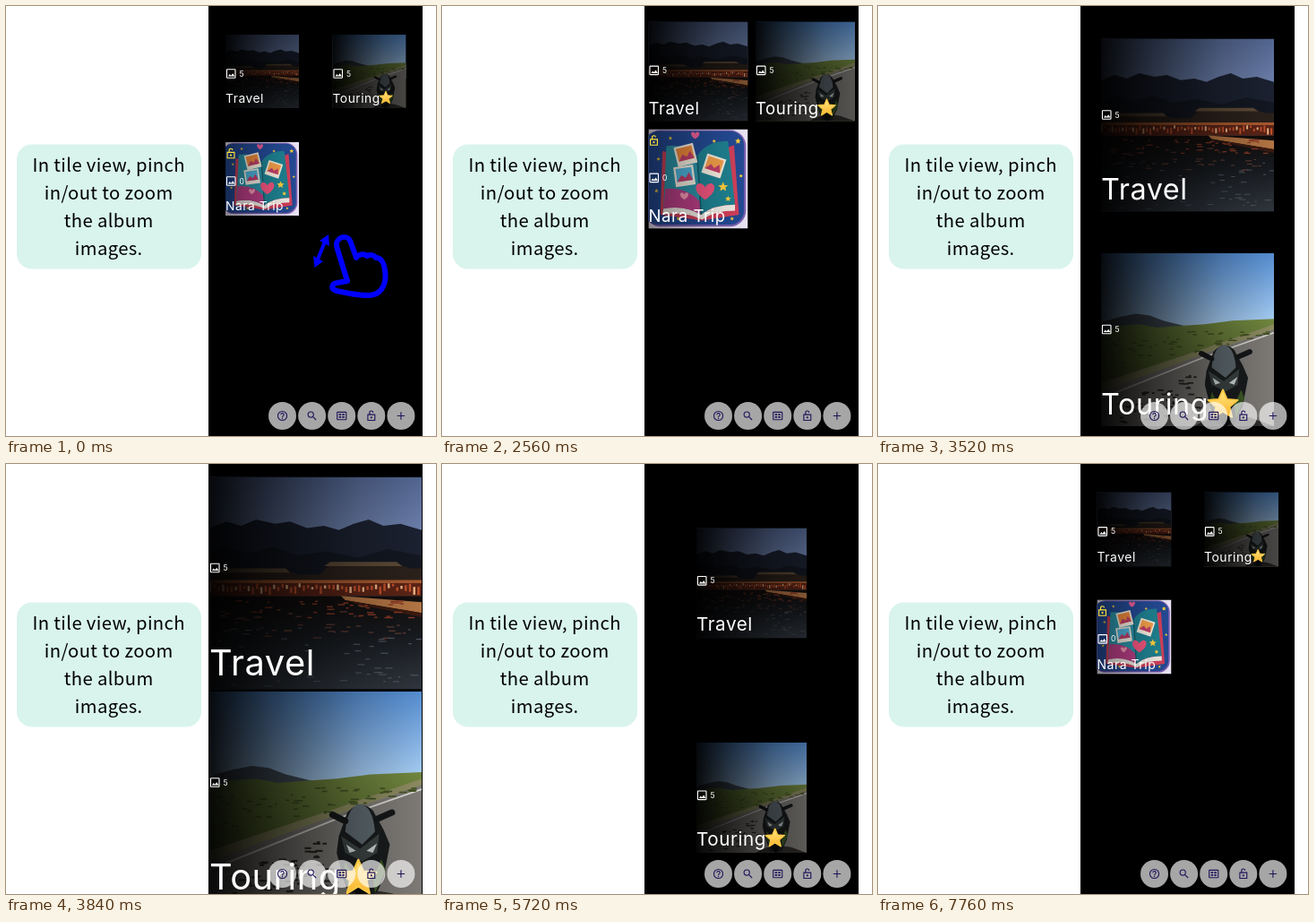
These frames come from a looping animation (480 px wide and 480 px high, 8.24 s). An HTML page:

```html
<!DOCTYPE html>
<html lang="en">
<head>
<meta charset="utf-8">
<title>Tile view zoom</title>
<style>
html, body { margin: 0; width: 100%; height: 100%; overflow: hidden; background: #fff; }
svg { display: block; width: 100vw; height: 100vh; }
.note { font: 20.3px "Noto Sans CJK JP", "Noto Sans CJK", "Noto Sans", sans-serif; letter-spacing: .35px; text-anchor: middle; }
.name { font-family: Inter, Roboto, sans-serif; letter-spacing: .55px; fill: #fff; }
.count { font: 8.5px Inter, Roboto, sans-serif; fill: #fff; }
.line { fill: none; stroke: currentColor; stroke-width: 2; }
.dot { fill: currentColor; }
</style>
</head>
<body>
<svg id="stage" viewBox="0 0 480 480">
  <defs>
    <clipPath id="screen"><rect x="226" width="239" height="480"/></clipPath>
    <clipPath id="square"><rect width="100" height="100"/></clipPath>
    <linearGradient id="shade">
      <stop stop-opacity=".93"/>
      <stop offset=".3" stop-opacity=".6"/>
      <stop offset=".7" stop-opacity=".2"/>
      <stop offset="1" stop-opacity="0"/>
    </linearGradient>
    <linearGradient id="dusk" x2="0" y2="1">
      <stop stop-color="#52658f"/><stop offset=".5" stop-color="#7083ae"/>
    </linearGradient>
    <linearGradient id="water" x2="0" y2="1">
      <stop stop-color="#120d0c"/><stop offset=".4" stop-color="#16191d"/><stop offset="1" stop-color="#30363e"/>
    </linearGradient>
    <linearGradient id="day" x2="0" y2="1">
      <stop stop-color="#548cd0"/><stop offset=".7" stop-color="#abd0f4"/>
    </linearGradient>
    <linearGradient id="grass" x2="0" y2="1">
      <stop stop-color="#71873f"/><stop offset=".6" stop-color="#4f6029"/>
    </linearGradient>
    <linearGradient id="gold" x2="0" y2="1">
      <stop stop-color="#ffe680"/><stop offset="1" stop-color="#fbb52c"/>
    </linearGradient>

    <path id="star" d="M0-1 .28-.36 1-.3 .45 .16 .62 .85 0 .48-.62 .85-.45 .16-1-.3-.28-.36Z"/>
    <path id="heart" d="M0 1C-1.6 0-1-1 -.5-.8Q-.1-.7 0-.35Q.1-.7 .5-.8C1-1 1.6 0 0 1Z"/>

    <g id="image">
      <rect class="line" x="3.5" y="3.5" width="17" height="17" rx="1"/>
      <path class="dot" d="M6 17.5l3.5-4.5 2.5 3 3.5-4.5 4 6z"/>
    </g>
    <g id="lock">
      <path class="line" d="M5 9.5H19V21H5ZM8.5 9.5V6a3.5 3.5 0 0 1 7-.5"/>
      <circle class="dot" cx="12" cy="15.2" r="2"/>
    </g>
    <g id="help">
      <circle class="line" cx="12" cy="12" r="9"/>
      <path class="line" d="M9 9.8a3 3 0 1 1 4.6 2.4Q12 13.3 12 15"/>
      <circle class="dot" cx="12" cy="17.3" r="1.2"/>
    </g>
    <g id="search">
      <circle class="line" cx="9.5" cy="9.5" r="5.5"/>
      <path class="line" d="M14 14l6 6"/>
    </g>
    <g id="grid">
      <rect class="line" x="3" y="4.5" width="18" height="15" rx="1"/>
      <path class="dot" d="M6.5 8H11V11H6.5ZM13 8H17.5V11H13ZM6.5 13H11V16H6.5ZM13 13H17.5V16H13Z"/>
    </g>
    <path id="plus" class="line" d="M12 4.5v15M4.5 12h15"/>

    <g id="lake" clip-path="url(#square)">
      <rect width="100" height="60" fill="url(#dusk)"/>
      <path d="M0 24L8 21 15 23 22 20 31 22 38 21 46 24 54 23 61 25 68 22 75 20 82 23 90 22 100 25V55H0Z" fill="#1b2130"/>
      <path d="M0 36L9 33 18 36 30 33 42 37 55 35 70 38 84 34 100 37V56H0Z" fill="#131721"/>
      <rect y="56" width="100" height="44" fill="url(#water)"/>
      <path d="M0 47L6 44H36L42 46H52L57 41H88L95 43H100V50H0Z" fill="#2b211b"/>
      <path d="M57 40H88L91 42H54ZM6 43H36L38 45H3Z" fill="#5c4a36"/>
      <rect y="49" width="100" height="7" fill="#5c2416"/>
      <path d="M0 48.500H100V50H0Z" fill="#a9592f"/>
      <path d="M62 56L100 59V64L64 58Z" fill="#b27443"/>
      <path d="M64 58L100 64V66L70 60Z" fill="#3a1a10"/>
      <g id="lamps"></g>
      <g id="glints"></g>
    </g>

    <g id="road" clip-path="url(#square)">
      <rect width="100" height="60" fill="url(#day)"/>
      <path d="M0 40L10 37 20 35 28 36 36 39 48 42 56 46H0Z" fill="#4a5663"/>
      <path d="M0 45L10 42 22 41 32 43 46 42 60 41 76 39 100 38V100H0Z" fill="url(#grass)"/>
      <path d="M100 44L60 57 0 78V100H100Z" fill="#7d7a76"/>
      <path d="M0 75L60 55 100 41V44L60 58 0 80Z" fill="#8b8a60"/>
      <path d="M0 84L60 60 100 46" fill="none" stroke="#dcdad5" stroke-width=".8"/>
      <g id="pebbles"></g>
      <path d="M54 100Q68 91 86 95L100 100Z" fill="#2f2d2b"/>
      <path d="M61 68L65 57Q71 50 77 56L82 65 85 72 82 88 77 99H67L63 88 60 76Z" fill="#191c1d"/>
      <path d="M64 66Q65 54 71 53Q77 54 78 66L72 72Z" fill="#5c676d"/>
      <path d="M62 68L71 74 80 67 79 76 72 80 64 76Z" fill="#3a4242"/>
      <path d="M64.500 72L69 75 66 76ZM79 71.500L74 75 77 76Z" fill="#cfd6d6"/>
      <path d="M64 80L68 88 67 95 63 86ZM81 79L77 88 78 95 83 84Z" fill="#3c5a25"/>
      <path d="M58 58L64 61M79 60L86 57" stroke="#151718" stroke-width="3" stroke-linecap="round"/>
      <ellipse cx="72" cy="92" rx="3.6" ry="8" fill="#0b0c0c"/>
    </g>

    <g id="book" clip-path="url(#square)">
      <rect width="100" height="100" fill="#e9e3f4"/>
      <rect x="-4" y="1" width="102" height="97" rx="16" fill="#7b5fb0"/>
      <rect x="-4" y="2" width="100" height="94" rx="14" fill="#244a94"/>
      <path d="M14 22L50 30 86 16 91 86 54 92 12 86Z" fill="#d2405a"/>
      <path d="M18 17Q38 14 49 27L53 86Q36 76 15 80Z" fill="#2c93a8"/>
      <path d="M49 27Q58 12 80 12L87 76Q66 76 53 86Z" fill="#1f8292"/>
      <path d="M15 80Q36 76 53 86 66 76 87 76V82Q66 82 54 91 36 82 14 86Z" fill="#f2ede6"/>
      <path d="M17 60Q38 58 52 73L53 86Q36 76 15 80Z" fill="#b93f86"/>
      <path d="M49 27L53 86" stroke="#145b6c" stroke-width="1.5"/>
      <g id="snaps"></g>
      <use href="#heart" transform="translate(57 62) scale(9)" fill="#f2557f"/>
      <use href="#heart" transform="translate(47 6) scale(4)" fill="#f0609a"/>
      <use href="#heart" transform="translate(36 67) scale(4)" fill="#f59ab5"/>
      <g id="sparks" fill="#ffd13d"></g>
    </g>
  </defs>

  <rect width="480" height="480" fill="#fff"/>
  <rect x="12" y="154.5" width="206" height="139" rx="17" fill="#d9f4ed"/>
  <g class="note">
    <text x="114.7" y="185.2">In tile view, pinch</text>
    <text x="114.7" y="216">in/out to zoom</text>
    <text x="114.7" y="246.700">the album</text>
    <text x="114.7" y="277.500">images.</text>
  </g>

  <g clip-path="url(#screen)">
    <rect x="226" width="239" height="480"/>
    <g id="tiles"></g>
    <g id="hand" fill="none" stroke="#00f" stroke-width="6" stroke-linejoin="round">
      <path d="M381 307L369.500 270C366 259 380 253 384.500 263L391 281C394 277 399 276 403 279C407 277 411 278 413 281C420 281 423 290 423.500 300C424 313 417 323 405 323C396 323 390 322 384 321L369 318C362 316 363 310 370 309Z"/>
      <path d="M356.500 262L347.500 284" stroke-width="4"/>
      <path d="M360 255L350 262 361 268ZM344.500 292L343 279 354 285Z" fill="#00f" stroke="none"/>
    </g>
    <g id="bar" color="#20155a"></g>
  </g>
</svg>
<script>
const LOOP = 8240, FRAME = 40;
const $ = id => document.getElementById(id);

function add(parent, tag, attrs, text) {
  const el = document.createElementNS("http://www.w3.org/2000/svg", tag);
  set(el, attrs);
  if (text) el.textContent = text;
  return parent.appendChild(el);
}
function set(el, attrs) {
  for (const k in attrs) el.setAttribute(k, attrs[k]);
}

let seed = 7;
const rand = (a, b) => {
  seed = seed * 16807 % 2147483647;
  return a + (b - a) * seed / 2147483647;
};

function specks(id, n, color, height, place) {
  for (let i = 0; i < n; i++) {
    const [x, y] = place();
    add($(id), "rect", { x, y, width: rand(1, 4), height, fill: color });
  }
}

function paintPhotos() {
  for (let x = 0; x < 100; x += 2) {
    add($("lamps"), "rect", { x, y: rand(50, 52), width: 1, height: rand(1, 4), fill: x % 3 ? "#c4522c" : "#f2b98a" });
  }
  specks("glints", 45, "#8a3a26", .6, () => [rand(5, 95), rand(58, 66)]);
  specks("glints", 35, "#593831", .6, () => [rand(5, 95), rand(63, 76)]);
  specks("glints", 50, "#4c5560", .5, () => [rand(0, 98), rand(70, 100)]);
  specks("pebbles", 60, "#282623", .9, () => {
    const x = rand(8, 62);
    return [x, 88 - x * .35 + rand(0, 22)];
  });
  specks("pebbles", 60, "#435222", .7, () => {
    const x = rand(0, 98);
    return [x, 45 + rand(0, 28) * (1 - x / 100)];
  });
  for (const [x, y, turn, sky] of [[37, 25, -14, "#f08a3c"], [66, 36, 18, "#f5a04a"], [36, 46, -8, "#4fb4dc"]]) {
    const g = add($("snaps"), "g", { transform: `translate(${x} ${y}) rotate(${turn})` });
    add(g, "rect", { x: -10, y: -9, width: 20, height: 20, fill: "#f8efe2" });
    add(g, "rect", { x: -8, y: -7, width: 16, height: 13, fill: sky });
    add(g, "path", { d: "M-8 6L-3 0 1 3 5-2 8 6Z", fill: "#c33f6c" });
  }
  for (const [x, y, r] of [[75, 58, 5], [90, 12, 3], [10, 30, 2], [66, 12, 2], [22, 9, 2], [93, 47, 2], [80, 70, 3], [8, 62, 2], [30, 90, 2], [84, 90, 2]]) {
    add($("sparks"), "use", { href: "#star", transform: `translate(${x} ${y}) scale(${r})` });
  }
}

function makeTile([name, photo, count, locked, starred]) {
  const g = add($("tiles"), "g", {});
  const icon = id => add(g, "use", { href: id });
  const tile = {
    g, photo: icon("#" + photo),
    shade: add(g, "rect", { fill: "url(#shade)", opacity: locked ? .45 : 1 }),
    dim: locked ? null : add(g, "rect", {}),
    image: icon("#image"),
    count: add(g, "text", { class: "count", x: 15.5 }, count),
    name: add(g, "text", { class: "name" }, name)
  };
  set(tile.image, { color: "#fff" });
  if (locked) set(icon("#lock"), { color: "#ffe23c", transform: "translate(-.7 6) scale(.56)" });
  if (starred) {
    tile.star = add(g, "use", { href: "#star", fill: "url(#gold)", stroke: "#fcc845", "stroke-width": .12, "stroke-linejoin": "round" });
  }
  return tile;
}

function placeTile(tile, cx, cy, s) {
  const iconY = s - (.626 * s - 12.8);
  set(tile.g, { transform: `translate(${cx - s / 2} ${cy - s / 2})` });
  set(tile.photo, { transform: `scale(${s / 100})` });
  set(tile.shade, { width: s, height: s });
  if (tile.dim) set(tile.dim, { width: s, height: s, opacity: Math.max(0, 1 - s / 190) * .75 });
  set(tile.image, { transform: `translate(-.5 ${iconY - 6.7}) scale(.56)` });
  set(tile.count, { y: iconY + 3.1 });
  set(tile.name, { y: s * .935 - .5, "font-size": s * .168 });
  if (tile.star) {
    set(tile.star, { transform: `translate(${3 + .689 * s} ${.887 * s - 2.3}) scale(${.082 * s + .6})` });
  }
}

// Tile edge length over time; the pinch is linear between these points.
const SIZE = [
  [0, 82], [2060, 82], [2560, 111], [2700, 119], [3520, 193], [3720, 211], [3840, 237],
  [4960, 237], [5320, 189], [5720, 123], [5760, 113], [5800, 106], [6160, 84], [6320, 84], [6560, 83], [LOOP, 83]
];
function sizeAt(t) {
  const i = SIZE.findIndex(p => p[0] > t);
  const [t0, a] = SIZE[i - 1], [t1, b] = SIZE[i];
  return a + (b - a) * (t - t0) / (t1 - t0);
}

function draw(t) {
  const s = sizeAt(t), single = t >= 2700 && t < 5740;
  tiles.forEach((tile, i) => {
    if (single) placeTile(tile, 345.5, 133 + 239.5 * i, s);
    else placeTile(tile, 286 + 119.5 * (i % 2), 73 + 120 * (i >> 1), s);
  });
  const p = Math.min(1, Math.max(0, (t - 480) / 840)), k = 1 + .5 * p;
  set($("hand"), {
    opacity: 1 - p,
    transform: `translate(384.500 290.500) scale(${k}) translate(-384.500 -290.500)`
  });
}

paintPhotos();
const tiles = [
  ["Travel", "lake", "5"],
  ["Touring", "road", "5", false, true],
  ["Nara Trip", "book", "0", true]
].map(makeTile);

["help", "search", "grid", "lock", "plus"].forEach((id, i) => {
  const x = 308.5 + 33.1 * i;
  add($("bar"), "circle", { cx: x, cy: 457.5, r: 15.5, fill: "#fff", opacity: .65 });
  add($("bar"), "use", { href: "#" + id, transform: `translate(${x - 6.7} 450.8) scale(.56)` });
});

function tick() {
  const t = performance.now() % LOOP;
  draw(Math.floor(t / FRAME) * FRAME);
  requestAnimationFrame(tick);
}
tick();
</script>
</body>
</html>
```
